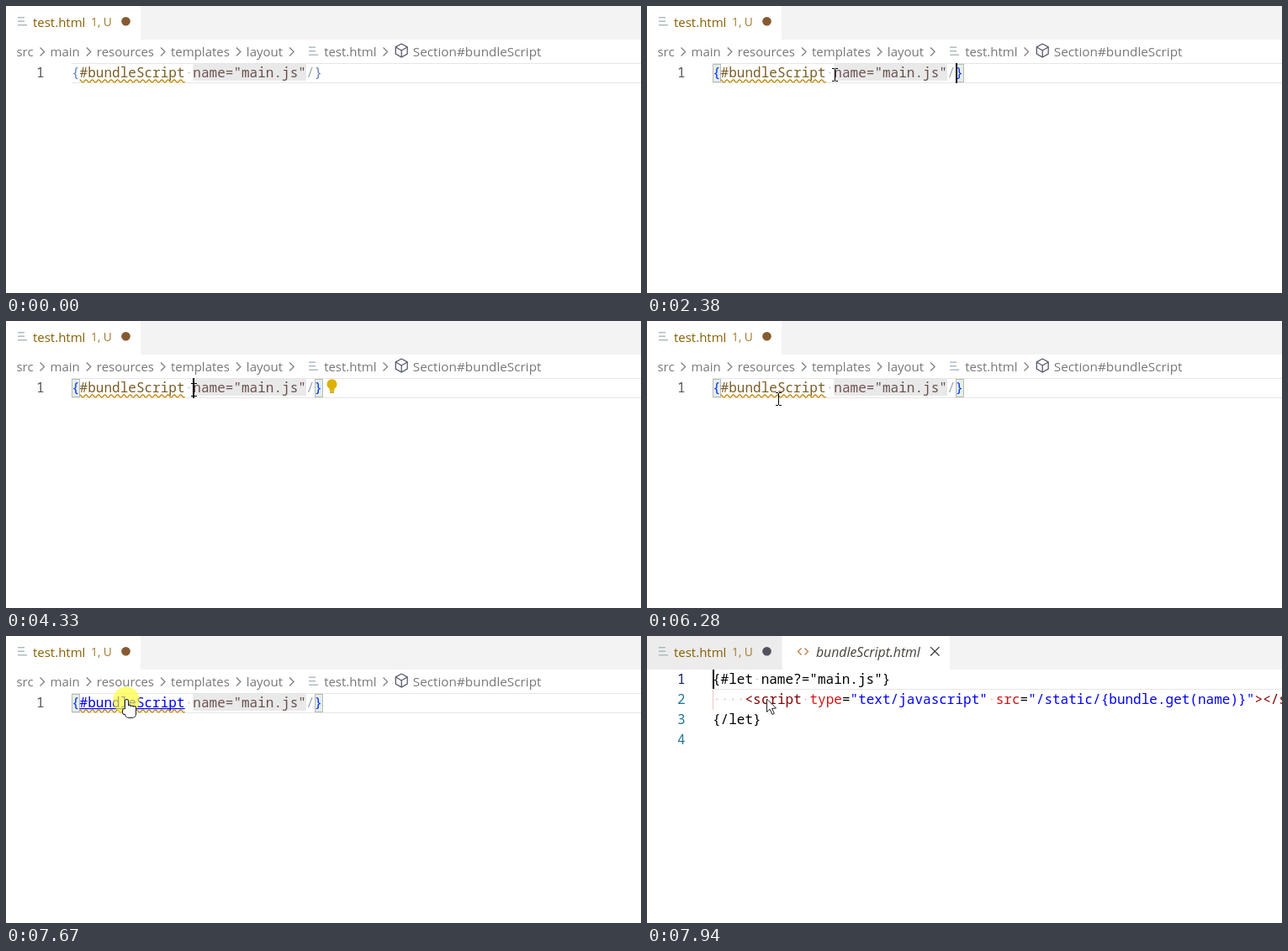
An HTML page with a canvas for the animation above (8000 ms loop, 755 by 342 pixels).

```html
<!DOCTYPE html>
<html lang="en">
<head>
<meta charset="utf-8">
<title>Editor</title>
<style>
html, body { margin: 0; width: 100%; height: 100%; overflow: hidden; background: #fff; }
canvas { display: block; width: 755px; height: 342px; }
</style>
</head>
<body>
<canvas id="stage"></canvas>
<script>
const W = 755, H = 342, LOOP = 8000;
const canvas = document.getElementById('stage');
const ctx = canvas.getContext('2d');
const scale = window.devicePixelRatio || 1;
canvas.width = W * scale;
canvas.height = H * scale;

const UI = '"Open Sans", "Noto Sans", sans-serif';
const MONO = '16.03px "Noto Sans Mono", "DejaVu Sans Mono", monospace';
const CELL = 9.62, LEFT = 78, ROW = 24;
const STEP = 70, BLINK = 535;
const INK = '#000', GRAY = '#777', RULE = '#e6e6e6';
const col = n => LEFT + n * CELL;

function rect(x, y, w, h, color) {
  ctx.fillStyle = color;
  ctx.fillRect(x, y, w, h);
}

function line(points, color, width = 1.3) {
  ctx.beginPath();
  points.forEach(([x, y]) => ctx.lineTo(x, y));
  ctx.strokeStyle = color;
  ctx.lineWidth = width;
  ctx.stroke();
}

function disc(x, y, r, color) {
  ctx.beginPath();
  ctx.arc(x, y, r, 0, Math.PI * 2);
  ctx.fillStyle = color;
  ctx.fill();
}

function text(s, x, y, color, font = MONO) {
  ctx.font = font;
  ctx.fillStyle = color;
  ctx.fillText(s, x, y);
}

// Draws interface text and returns its right edge
function label(s, x, y, color, size = 15, style = '') {
  text(s, x, y, color, `${style} ${size}px ${UI}`);
  return x + ctx.measureText(s).width;
}

// Coloured runs of code; spaces show as small dots
function code(y, runs, dot = '#c6c6c6') {
  let n = 0;
  for (const [s, color] of runs) {
    text(s, col(n), y, color);
    for (const ch of s) {
      if (ch === ' ') disc(col(n + 0.5), y - 5.5, 1, dot);
      n++;
    }
  }
}

function fileIcon(x, y) {
  for (let i = 0; i < 3; i++) rect(x, y + i * 4.5, i < 2 ? 8 : 11, 1.4, '#a9b6bc');
}

// Angle bracket; dir 1 points right, -1 left
const angle = (x, y, h, dir, color) =>
  line([[x - dir * h / 4, y - h / 2], [x + dir * h / 4, y], [x - dir * h / 4, y + h / 2]], color);

function cube(x, y) {
  const corner = i => [x + 8 * Math.sin(i * Math.PI / 3), y - 8 * Math.cos(i * Math.PI / 3)];
  const color = '#565a6c';
  line([0, 1, 2, 3, 4, 5, 6].map(corner), color);
  for (const i of [1, 3, 5]) line([corner(i), [x, y]], color);
}

function tabs(opened) {
  rect(0, 0, W, 40, '#f3f3f3');
  rect(0, 0, 160, 40, opened ? '#ececec' : '#fff');
  fileIcon(14, 13);
  label('test.html', 32, 25, '#855f00');
  label('1, U', 101, 24, '#a07a2c', 13.8);
  disc(142.5, 18.3, 5.3, opened ? '#52525c' : '#855a30');
  if (!opened) return;
  rect(161, 0, 199, 40, '#fff');
  angle(181.5, 18.5, 8, -1, '#bd7b42');
  angle(189.5, 18.5, 8, 1, '#bd7b42');
  label('bundleScript.html', 201, 25, '#454138', 15.8, 'italic');
  for (const d of [-5.2, 5.2]) line([[342.3 - d, 13.1], [342.3 + d, 23.5]], '#3c3c3c');
}

function breadcrumbs() {
  let x = 12.4;
  const crumb = (s, size) => { x = label(s, x, 60, GRAY, size); };
  const next = () => {
    angle(x + 10.5, 54.5, 10, 1, '#808080');
    x += 20;
  };
  for (const s of ['src', 'main', 'resources', 'templates', 'layout']) {
    crumb(s);
    next();
  }
  fileIcon(x + 11, 48.5);
  x += 29;
  crumb('test.html');
  next();
  cube(x + 9.7, 53);
  x += 23.3;
  crumb('Section#bundleScript', 15.3);
}

function bracketBox(n) {
  const x = Math.round(col(n));
  rect(x, 69, 10, 22, '#b9b9b9');
  rect(x + 1, 70, 8, 20, '#e5efe5');
}

function squiggle(x1, x2) {
  const points = [];
  for (let x = x1; x <= x2; x += 0.5) {
    points.push([x, 89.5 - 1.5 * Math.cos((x - x1) / 7.5 * Math.PI * 2)]);
  }
  line(points, '#bf8803');
}

function bulb() {
  disc(387.5, 75.3, 6, '#ddb100');
  rect(384.5, 79, 6, 4, '#ddb100');
  rect(385, 83.5, 5, 2.2, '#c29b00');
}

// Key presses move the caret to a column; each one restarts the blink
const KEYS = [[1440, 15], [2380, 30], [2970, 29], [3330, 14], [3520, 13], [3870, 1], [4260, 15]];

function caret(t) {
  const key = KEYS.filter(k => k[0] <= t).pop();
  if (!key || t >= 5890 || (t - key[0]) % (2 * BLINK) >= BLINK) return;
  rect(Math.round(col(key[1])), 68, 2, ROW, INK);
}

function firstFile(t) {
  const active = t >= 1500, link = t >= 6600;
  breadcrumbs();
  for (const y of [68, 91]) rect(LEFT, y, W, 1, RULE);
  rect(col(15), 69, 14 * CELL, 20, '#e9e9e9');
  if (active) [0, 30].forEach(bracketBox);
  text('1', 36, 85, '#555');
  const brace = active ? '#0431fa' : '#5f7fc4';
  code(85, [['{', brace], ['#bundleScript', link ? '#0000ff' : '#795e26'], [' ', INK],
    ['name=', '#6e5252'], ['"main.js"', '#66504d'], ['/', '#9cabae'], ['}', brace]]);
  if (link) rect(col(1), 86, 13 * CELL, 1.2, '#0000ff');
  squiggle(col(1), col(14));
  if (t >= 4000 && t < 4600) bulb();
  caret(t);
}

function secondFile() {
  const tag = '#800000', attr = '#d81010', str = '#0000ff';
  rect(LEFT, 63, W, 1, RULE);
  for (let i = 0; i < 4; i++) text(i + 1, 36, 57 + i * ROW, i ? '#237893' : '#0b216f');
  rect(LEFT, 64, 1, ROW, '#f0c4c4');
  code(57, [['{#let name?="main.js"}', INK]]);
  code(57 + ROW, [['    ', INK], ['<script', tag], [' type', attr], ['=', INK],
    ['"text/javascript"', str], [' src', attr], ['=', INK],
    ['"/static/{bundle.get(name)}"', str], ['></' + 'script>', tag]], '#dfbcbc');
  code(57 + 2 * ROW, [['{/let}', INK]]);
  rect(LEFT, 40, 2, 23, INK);
}

function popup(alpha) {
  const x = 99, body = '#616161', link = '#006ab1', edge = '#c8c8c8';
  ctx.globalAlpha = alpha;
  rect(90, 93, W, 102, '#f3f3f3');
  rect(90, 195, W, 29, '#e8e8e8');
  for (const y of [92, 127, 195, 224]) rect(90, y, W, 1, edge);
  rect(89, 92, 1, 133, edge);
  text('Missing required parameter(s) `bundle` of `bundleScript` user tag.', x, 115, body);
  text('qu', x + 67 * CELL - 2, 115, '#999');
  const end = label('#bundleScript', x, 152, body, 16.4, 'bold');
  label(' user tag', end, 152, body, 16.5);
  label('Defined in bundleScript.html', x, 186, body, 16.5);
  label('View Problem (Alt+F8)', x, 216, link, 14.5);
  label('Quick Fix... (Ctrl+;)', 267, 216, link, 14.5);
  ctx.globalAlpha = 1;
}

// Pointer stops, and the glides between them along quadratic curves
const ENTRY = [560, 283], REST = [404, 153], WORD = [223, 82], LINK = [143, 76];
const GLIDES = [
  { begin: 130, time: 410, a: ENTRY, bend: [480, 218], b: REST },
  { begin: 800, time: 560, a: REST, bend: [310, 112], b: WORD },
  { begin: 5890, time: 640, a: WORD, bend: [137, 107], b: LINK }
];

function pointerAt(t) {
  const glide = GLIDES.filter(g => g.begin <= t).pop();
  if (!glide) return null;
  const { begin, time, a, bend, b } = glide;
  const u = Math.min(1, Math.floor((t - begin) / STEP) * STEP / time), v = 1 - u;
  return a.map((p, i) => Math.round(v * v * p + 2 * u * v * bend[i] + u * u * b[i]));
}

function iBeam(x, y) {
  rect(x, y - 7, 1, 14, INK);
  for (const dy of [-8, 7]) {
    rect(x - 3, y + dy, 3, 1, INK);
    rect(x + 1, y + dy, 3, 1, INK);
  }
}

function arrow(x, y) {
  ctx.beginPath();
  [[0, 0], [0, 15.5], [3.6, 12.2], [6.4, 18.5], [8.8, 17.4], [6.1, 11.4], [11, 11]]
    .forEach(([dx, dy]) => ctx.lineTo(x + dx, y + dy));
  ctx.closePath();
  ctx.fillStyle = '#fff';
  ctx.fill();
  ctx.strokeStyle = '#222';
  ctx.lineWidth = 1;
  ctx.stroke();
}

// Outline all parts first, then fill, so they merge into one hand
function hand(x, y) {
  ctx.beginPath();
  ctx.roundRect(x - 1.5, y, 3, 14, 1.5);
  for (let i = 1; i < 4; i++) ctx.roundRect(x - 1.5 + i * 3, y + 6 + i * 0.7, 3, 8, 1.5);
  ctx.roundRect(x - 4.5, y + 11, 5, 6, 2);
  ctx.roundRect(x - 1.5, y + 10, 12, 11, [0, 0, 4, 4]);
  ctx.strokeStyle = '#222';
  ctx.lineWidth = 2;
  ctx.stroke();
  ctx.fillStyle = '#fff';
  ctx.fill();
}

function pointer(t) {
  const at = pointerAt(t);
  if (!at) return;
  const [x, y] = at;
  if ((t >= 1430 && t < 1570) || (t >= 6670 && t < 7940)) {
    disc(x, y + 0.5, 16, 'rgba(255, 255, 45, .65)');
  }
  if (t >= 7740) arrow(x - 0.5, y - 1);
  else if (t >= 6600) hand(x + 0.5, y);
  else iBeam(x, y);
}

function draw(t) {
  ctx.setTransform(scale, 0, 0, scale, 0, 0);
  rect(0, 0, W, H, '#fff');
  const opened = t >= 7810;
  tabs(opened);
  if (!opened) firstFile(t);
  else if (t >= 7880) secondFile();
  if (t >= 6740 && t < 7670) popup(Math.min(1, 0.33 * (1 + Math.floor((t - 6730) / STEP))));
  pointer(t);
}

const start = performance.now();
function tick() {
  draw((performance.now() - start) % LOOP);
  requestAnimationFrame(tick);
}
draw(0);
requestAnimationFrame(tick);
</script>
</body>
</html>
```
